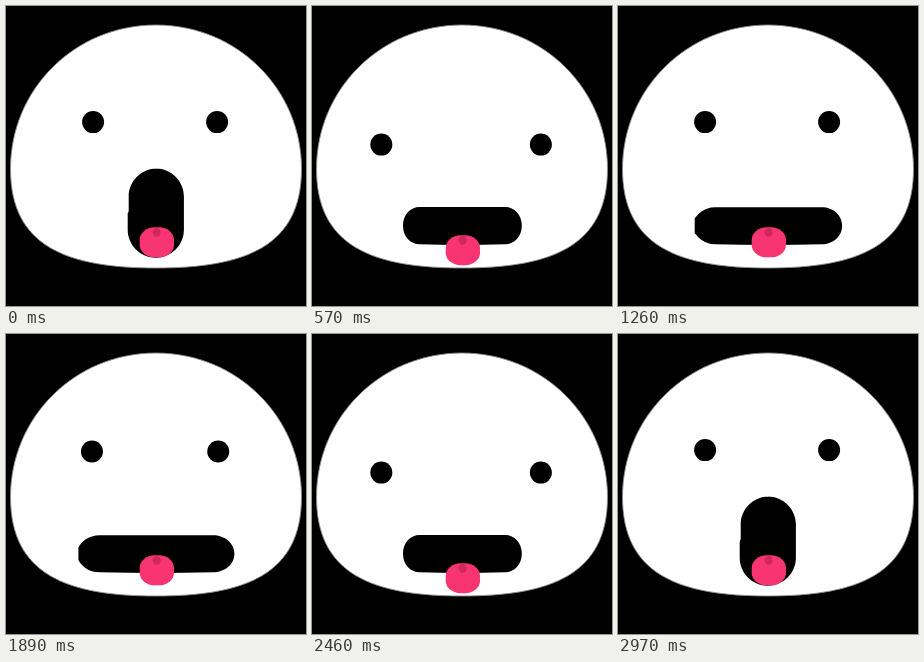
Recreate the animation shown at these times as an HTML page. Size 300 by 300 pixels, loop 3.03 s.

```html
<!DOCTYPE html>
<html lang="en">
<head>
<meta charset="utf-8">
<title>Gaping face</title>
<style>
  html, body { margin: 0; width: 100%; height: 100%; overflow: hidden; background: #000; }
  svg { display: block; width: 100vw; height: 100vh; }
</style>
</head>
<body>
<svg viewBox="0 0 300 300">
  <path fill="#fff" stroke="#8c8c8c" stroke-width=".9"
    d="M4.5 163C4.5 83 69 19 150 19S295.5 83 295.5 163C295.5 240 240 262 150 262S4.5 240 4.5 163Z"/>
  <circle id="leftEye" r="11"/>
  <circle id="rightEye" r="11"/>
  <path id="mouth"/>
  <g id="tongue">
    <rect x="133.7" width="34.3" height="30" rx="15" ry="12.5" fill="#f93472"/>
    <ellipse cx="150.6" cy="5" rx="4" ry="4.4" fill="#d0285e"/>
  </g>
</svg>
<script>
const STEP = 30, LOOP = 3030;
const $ = id => document.getElementById(id);
const lerp = (a, b, p) => a + (b - a) * p;

// Smooth 0 to 1 between two times
function ease(t, from, to) {
  const p = Math.min(1, Math.max(0, (t - from) / (to - from)));
  return p * p * (3 - 2 * p);
}

// open: tall pose, wide: flat pose, bevel: cut of the left corners
function mouthPath(open, half, bevel) {
  const k = .45; // circular corner control
  const cx = lerp(150.4, 149.8, open);
  const l = cx - half, r = cx + half, ul = l + open;
  const top = lerp(201.2, 162.5, open), bottom = lerp(238.3, 251.8, open);
  const mid = (top + bottom) / 2;
  const rx = half * lerp(.275, 1, open), ry = lerp(18, 28, open);
  const side = lerp(ry, 11, bevel), cut = 3.5 * bevel;
  const ctl = lerp(side * k, 7, bevel);
  return `M${ul + rx} ${top}H${r - rx}
    C${r - rx * k} ${top} ${r} ${top + ry * k} ${r} ${top + ry}
    V${bottom - ry}
    C${r} ${bottom - ry * k} ${r - rx * k} ${bottom} ${r - rx} ${bottom}
    Q${cx} ${bottom + 1.5 * (1 - open)} ${l + rx} ${bottom}
    C${l + rx * k} ${bottom} ${l + cut} ${bottom - ctl} ${l} ${bottom - side}
    V${mid}L${ul} ${mid - 2 * open}V${top + side}
    C${ul + cut} ${top + ctl} ${ul + rx * k} ${top} ${ul + rx} ${top}Z`;
}

function placeEye(eye, x, y) {
  eye.setAttribute("cx", x);
  eye.setAttribute("cy", y);
}

function render(time) {
  const stepped = Math.floor((time % LOOP) / STEP) * STEP;
  const t = Math.min(stepped, LOOP - stepped); // plays there and back

  const look = ease(t, 150, 695) - ease(t, 780, 1200);
  const eyeY = 116.1 + 26 * look, spread = 62 + 20.5 * look;
  placeEye($("leftEye"), 149.1 - spread, eyeY);
  placeEye($("rightEye"), 149.1 + spread, eyeY);

  const flatten = ease(t, 150, 585);
  const widen = ease(t, 585, 825);
  const settle = ease(t, 825, 1260);
  const half = 28.1 + 31.4 * flatten + 37.2 * widen - 23 * settle;
  $("mouth").setAttribute("d", mouthPath(1 - flatten, half, settle));
  $("tongue").setAttribute("transform", `translate(0 ${221.3 + 8 * (flatten - widen)})`);
}

const start = performance.now();
function tick() {
  render(performance.now() - start);
  requestAnimationFrame(tick);
}
tick();
</script>
</body>
</html>
```
